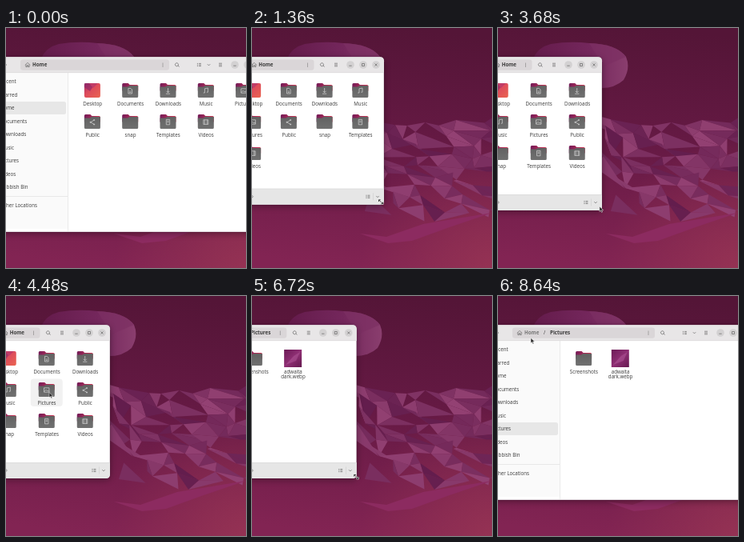
An HTML page for the animation above (8.72 s loop, 300 by 300 pixels).

```html
<!DOCTYPE html>
<html lang="en">
<head>
<meta charset="utf-8">
<title>Resizing a file manager</title>
<style>
html, body { margin: 0; width: 100%; height: 100%; overflow: hidden; background: #651b45; }
svg { display: block; width: 100vw; height: 100vh; }
text { font: 6.2px "Open Sans", "Noto Sans", sans-serif; fill: #3a3a3a; }
.bold { font-weight: 700; }
.mid { text-anchor: middle; }
.end { text-anchor: end; }
.line { fill: none; stroke: #5c5c5c; stroke-width: .65; }
.glyph { fill: none; stroke: #d6d6d6; stroke-width: .7; }
</style>
</head>
<body>
<svg viewBox="0 0 300 300">
  <defs>
    <linearGradient id="sky" x1=".6" y1="0" x2=".5" y2="1">
      <stop offset="0" stop-color="#541537"/>
      <stop offset=".5" stop-color="#671a45"/>
      <stop offset="1" stop-color="#822453"/>
    </linearGradient>
    <radialGradient id="glow" cx="1" cy="1" r=".55">
      <stop offset="0" stop-color="#9a3654" stop-opacity=".8"/>
      <stop offset="1" stop-color="#9a3654" stop-opacity="0"/>
    </radialGradient>
    <linearGradient id="bell">
      <stop offset="0" stop-color="#641b4b"/>
      <stop offset=".6" stop-color="#74275c"/>
      <stop offset="1" stop-color="#8a3e6e"/>
    </linearGradient>
    <linearGradient id="back">
      <stop offset="0" stop-color="#741b58"/>
      <stop offset="1" stop-color="#d33755"/>
    </linearGradient>
    <linearGradient id="front" x1="0" y1="0" x2="0" y2="1">
      <stop offset="0" stop-color="#626262"/>
      <stop offset="1" stop-color="#707070"/>
    </linearGradient>
    <linearGradient id="desk" x1="0" y1="0" x2="1" y2="1">
      <stop offset="0" stop-color="#9b2a68"/>
      <stop offset=".4" stop-color="#dc4a5c"/>
      <stop offset="1" stop-color="#ea6450"/>
    </linearGradient>
    <linearGradient id="plum" x1="0" y1="0" x2="1" y2="1">
      <stop offset="0" stop-color="#6b1a55"/>
      <stop offset=".5" stop-color="#8f2f74"/>
      <stop offset="1" stop-color="#65194f"/>
    </linearGradient>
    <filter id="shade" x="-20%" y="-20%" width="140%" height="140%">
      <feGaussianBlur stdDeviation="4"/>
    </filter>
    <g id="folder">
      <path d="M-10 -7.5q0-1.5 1.5-1.5h6l2 2h9q1.5 0 1.5 1.5v6h-20z" fill="url(#back)"/>
      <path d="M-10 -4.5h7l2-1.6h11V7.5q0 1.5-1.5 1.5h-17q-1.5 0-1.5-1.5z" fill="url(#front)"/>
    </g>
    <g id="thumb">
      <rect x="-11" y="-11" width="22" height="22" fill="url(#plum)"/>
      <path d="M-9 8L1-3 9-8 4 3z" fill="#b25a9a" opacity=".5"/>
    </g>
  </defs>
  <g id="wall"></g>
  <g id="scene"></g>
</svg>
<script>
const LOOP = 8720, STEP = 80, LEFT = -28.5, TOP = 36.3;
const FOLDERS = ["Desktop", "Documents", "Downloads", "Music", "Pictures", "Public", "snap", "Templates", "Videos"];
const PLACES = ["Recent", "Starred", "Home", "Documents", "Downloads", "Music", "Pictures", "Videos", "Rubbish Bin"];
const GLYPHS = {
  Documents: "M-2.3-2.6h3l1.6 1.6v5h-4.6zM-1 1h2M-1 2.5h2",
  Downloads: "M0-3V2.6M-2 .8L0 2.8 2 .8M-2.6 4.2h5.2",
  Music: "M-1.4 3V-2.2L2.6-3V2.2M-3 3h1.6M1 2.2h1.6",
  Pictures: "M-3.2-2.2h6.4v5.4h-6.4zM-3 2.6L-.8 .2 .8 1.8 1.8 .8 3 2.4",
  Public: "M2.2-2L-2 .8 2.2 3.4M1.8-2.4h1v1h-1zM-2.8 .3h1v1h-1zM1.8 3h1v1h-1z",
  Templates: "M-2.2-2.6h4.4v6.4h-4.4zM-1.2-.8h2.4M-1.2 .8h2.4",
  Videos: "M-3-2.2h6v5.6h-6zM-1.5-2.2v5.6M1.5-2.2v5.6"
};

const path = (d, fill, extra = "") => `<path d="${d}" fill="${fill}" ${extra}/>`;
const stroke = (d, cls = "line") => `<path d="${d}" class="${cls}"/>`;
const box = (x, y, w, h, r, fill, extra = "") => `<rect x="${x}" y="${y}" width="${w}" height="${h}" rx="${r}" fill="${fill}" ${extra}/>`;
const label = (x, y, s, cls = "", extra = "") => `<text x="${x}" y="${y}" class="${cls}" ${extra}>${s}</text>`;
const at = (x, y, body) => `<g transform="translate(${x} ${y})">${body}</g>`;

const mix = (a, b, p) => a + (b - a) * p;
const span = (t, from, to) => Math.min(1, Math.max(0, (t - from) / (to - from)));
const smooth = p => p * p * (3 - 2 * p);
const smoother = p => p * p * p * (p * (6 * p - 15) + 10);

// Low-poly veil: a sagging mesh of long, randomly shaded triangles
function veil(cols, rows) {
  let seed = 11, out = "";
  const rand = () => (seed = seed * 16807 % 2147483647) / 2147483647;
  const mesh = Array.from({ length: rows + 1 }, (_, j) => Array.from({ length: cols + 1 }, (_, i) => {
    const u = i / cols, v = j / rows, sag = 30 * Math.sin(Math.PI * Math.sqrt(u)) * (.5 + .6 * v);
    return [122 + 190 * u + (rand() - .5) * 26, 106 + 6 * u + v * (82 + 42 * u) + sag + (rand() - .5) * 13];
  }));
  for (let j = 0; j < rows; j++) for (let i = 0; i < cols; i++) {
    const [a, b, c, d] = [mesh[j][i], mesh[j][i + 1], mesh[j + 1][i + 1], mesh[j + 1][i]];
    for (const tri of [[a, b, c], [a, c, d]]) {
      const light = rand(), gap = rand() < .15 + .35 * j / rows;
      const rgb = [mix(98, 148, light), mix(28, 66, light), mix(76, 116, light)].map(Math.round);
      if (!gap) out += path("M" + tri.map(p => p.map(n => n.toFixed(1))).join("L") + "z", `rgb(${rgb})`);
    }
  }
  return out;
}

document.getElementById("wall").innerHTML =
  box(0, 0, 300, 300, 0, "url(#sky)") + box(0, 0, 300, 300, 0, "url(#glow)") +
  path("M44 38Q50 24 66 20 90 16 114 19 148 20 160 36 166 50 157 65 146 75 130 75H60z", "url(#bell)") +
  path("M114 19Q148 20 160 36L132 48z", "#7d3063", 'opacity=".7"') +
  veil(8, 9) +
  path("M135 257L168 261 214 245 300 231 247 249 200 266 170 269z", "#8c2b60");

function size(t) {
  if (t < 6640) {
    const p = span(t, 480, 2240), rest = (1 - p) ** 2.5;
    return [mix(130, 328, rest), mix(228, 255, rest) - 12 * Math.sin(Math.PI * p)];
  }
  const p = smoother(span(t, 6640, 7680));
  return [mix(130, 320, p), mix(228, 255, p)];
}

function glide(t, t0, t1, from, to) {
  const p = smooth(span(t, t0, t1));
  return from.map((a, i) => mix(a, to[i], p));
}

const searchIcon = x => at(x, 46, stroke("M1.6 .9A2 2 0 1 1 1.6-1.4 2 2 0 0 1 1.6 .9L3 2.6"));
const menuIcon = x => at(x, 46, stroke("M-2-1.8h4M-2 0h4M-2 1.8h4"));
const listIcon = (x, y) => at(x, y, stroke("M-2.6-1.6h1.2M-.4-1.6h2.8M-2.6 0h1.2M-.4 0h2.8M-2.6 1.6h1.2M-.4 1.6h2.8"));
const chevron = (x, y) => at(x, y, stroke("M-1.7-.8L0 .9 1.7-.8"));
const kebab = x => at(x, 46, path("M-.4-2.3h.8v.9h-.8zM-.4-.4h.8v.9h-.8zM-.4 1.5h.8v.9h-.8z", "#555"));
const house = x => at(x, 46, stroke("M-3 .3L0-2.7 3 .3M-2.1-.3V2.6H-.7V.7H.7V2.6H2.1V-.3"));

function header(R, narrow, pics) {
  let s = path(`M${LEFT} 56V${TOP}H${R - 5}q5 0 5 5V56z`, "#e8e6e7") + box(LEFT, 55.6, R - LEFT, .5, 0, "#d2d2d2");
  const pillLeft = narrow ? -15 : 18, pillRight = R - (narrow ? 87.5 : 124);
  s += box(pillLeft, 39.5, pillRight - pillLeft, 13.2, 3, "#dad6d8") + kebab(R - (narrow ? 95.5 : 132));
  if (narrow) {
    const x = mix(4.7, 8.2, (R - 130) / 35);
    s += pics ? label(R - 107.5, 48.3, "Pictures", "bold end") : house(x - 5.5) + label(x, 48.3, "Home", "bold");
  } else {
    s += stroke("M-1.2 44.2L.7 46-1.2 47.8") + house(27);
    s += label(33, 48.3, "Home", "bold", pics ? 'style="fill:#777"' : "");
    if (pics) s += label(57, 48.3, "/") + label(65, 48.3, "Pictures", "bold");
    s += listIcon(R - 86.5, 46) + chevron(R - 74.5, 46);
  }
  s += searchIcon(R - (narrow ? 77.5 : 114.5)) + menuIcon(R - 60);
  ["M-1.5-1.5l3 3M1.5-1.5l-3 3", "M-1.5-1.5h3v3h-3z", "M-1.7 1.2h3.4"].forEach((d, i) => {
    s += at(R - 10 - 16 * i, 46, '<circle r="4.8" fill="#d3d1d2"/>' + stroke(d));
  });
  return s;
}

function sidebar(edge, B, pics) {
  const x = edge - 84;
  let s = box(LEFT, 56, edge - LEFT, B - 60, 0, "#fafafa") + box(edge, 56, .6, B - 56, 0, "#dcdcdc");
  s += box(LEFT, 92 + (pics ? 66 : 0), edge - LEFT - 2, 16, 2.5, "#e7e7e7");
  PLACES.forEach((name, i) => s += label(x, 69.2 + i * 16.5, name));
  return s + box(LEFT, 210, edge - LEFT, .6, 0, "#dcdcdc") + label(x, 223.6, "Other Locations");
}

function icon(name) {
  if (name === "Desktop") return box(-10, -9, 20, 18, 2, "url(#desk)") +
    path("M-9-9H4L-3 1-10-4v-4q0-1 1-1z", "#8d2769", 'opacity=".65"') + path("M-4-9L1-3 7-9z", "#c13d68");
  return '<use href="#folder"/>' + (GLYPHS[name] ? stroke(GLYPHS[name], "glyph") : "");
}

function grid(edge, R, pics, hover) {
  const pad = 7.25, room = R - edge - pad * 2, cols = Math.max(1, Math.floor(room / 43)), pitch = room / cols;
  return (pics ? ["Screenshots", "adwaita"] : FOLDERS).map((name, i) => {
    const x = edge + pad + pitch * (i % cols + .5), y = 78 + 39 * Math.floor(i / cols);
    let s = name === hover ? box(-20, -13.5, 40, 34.5, 4, "#f1f1f1") : "";
    s += name === "adwaita" ? '<use href="#thumb"/>' + label(.3, 24.8, "dark.webp", "mid") : icon(name);
    return at(x, y, s + label(.3, 18.5, name, "mid"));
  }).join("");
}

function footer(R, B) {
  const y = B - 10;
  return path(`M${LEFT} ${B - 20}H${R}V${B - 5}q0 5-5 5H${LEFT}z`, "#e6e6e6") +
    box(LEFT, B - 20, R - LEFT, .5, 0, "#d2d2d2") + stroke(`M-.6 ${y - 2}l2 2-2 2`) +
    listIcon(R - 20, y) + box(R - 13.7, y - 4.5, .5, 9, 0, "#c8c8c8") + chevron(R - 8, y);
}

function cursor(t, R, B) {
  const shrinking = t >= 480 && t <= 2400, growing = t >= 6480 && t <= 7760;
  if (shrinking || growing) {
    const lead = growing ? 4 * span(t, 6640, 7360) : -3;
    const d = "M-2.5-.3V-2.5H-.3M-2.5-2.5L2.5 2.5M2.5 .3V2.5H.3";
    return at(R - 1 + lead, B - 2 - Math.abs(lead) / 2,
      path(d, "none", 'stroke="#fff" stroke-width="1.8"') + path(d, "none", 'stroke="#222" stroke-width=".9"'));
  }
  if (t < 3680 || (t >= 6480 && t < 8080)) return "";
  const target = [54, 120.5], corner = [129, 226];
  const [x, y] = t < 5120 ? glide(t, 3600, 4400, corner, target)
    : t < 6480 ? glide(t, 5120, 6400, target, corner)
    : glide(t, 8000, 8640, [306, 250], [41, 52.5]);
  return at(x, y, path("M0 0V6.4L1.5 5 2.6 7.4 3.7 6.9 2.6 4.6H4.7z", "#222", 'stroke="#fff" stroke-width=".5"'));
}

function draw(t) {
  const [R, B] = size(t), narrow = R < 222, pics = t >= 4720;
  const edge = narrow ? LEFT : 77 + (Math.min(R, 320) - 320) * .04;
  const hover = t >= 4320 ? "Pictures" : "";
  const w = R - LEFT, h = B - TOP;
  document.getElementById("scene").innerHTML =
    box(LEFT, TOP + 2, w, h, 5, "#000", 'opacity=".35" filter="url(#shade)"') +
    box(LEFT, TOP, w, h, 5, "#fff", 'stroke="#3a1030" stroke-opacity=".35" stroke-width=".8"') +
    (narrow ? "" : sidebar(edge, B, pics)) + header(R, narrow, pics) +
    grid(edge, R, pics, hover) + (narrow ? footer(R, B) : "") + cursor(t, R, B);
}

const start = performance.now();
let last = -1;
function tick(now) {
  const t = Math.floor(Math.max(0, now - start) % LOOP / STEP) * STEP;
  if (t !== last) draw(last = t);
  requestAnimationFrame(tick);
}
tick(start);
</script>
</body>
</html>
```
